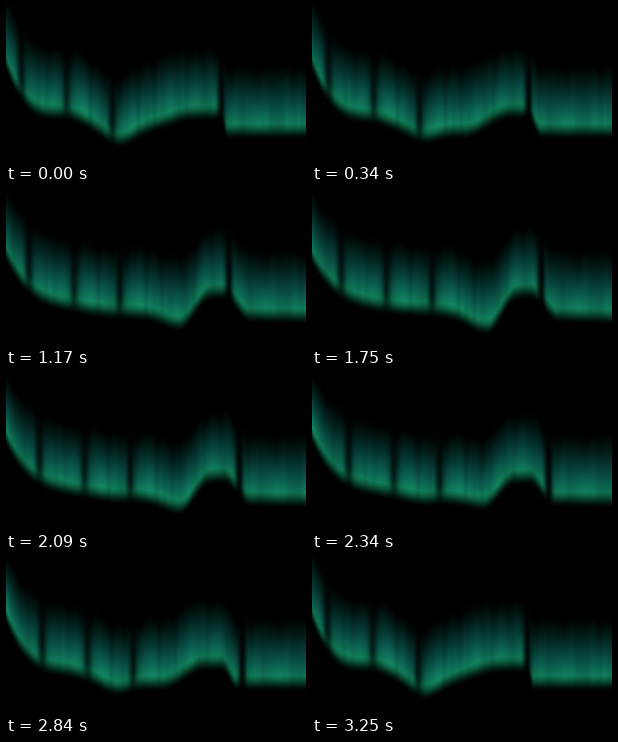
These frames come from a looping animation (300x156 px, 3.34 s). An HTML page with a canvas:

```html
<!DOCTYPE html>
<html lang="en">
<head>
<meta charset="utf-8">
<title>Aurora</title>
<style>
html, body { margin: 0; width: 100%; height: 100%; overflow: hidden; background: #000; }
canvas { display: block; width: 100%; height: 100%; }
</style>
</head>
<body>
<canvas id="sky" width="300" height="156"></canvas>
<script>
const W = 300, H = 156, LOOP = 3340, FPS = 12, STEPS = 40;
const ctx = document.getElementById('sky').getContext('2d');
const img = ctx.createImageData(W, H);

const clamp = v => Math.max(0, Math.min(1, v));
const smooth = v => { v = clamp(v); return v * v * (3 - 2 * v); };
const bell = (x, mid, size) => Math.exp(-(((x - mid) / size) ** 2));
const edge = (x, mid, half) => smooth((x - mid + half) / (2 * half));

// Smooth seeded noise in -1..1.
const hash = n => { const v = Math.sin(n * 127.1 + 3.7) * 43758.5; return (v - Math.floor(v)) * 2 - 1; };
function noise(x) {
  const i = Math.floor(x), u = smooth(x - i);
  return hash(i) * (1 - u) + hash(i + 1) * u;
}

// The folds drift right, ever faster, then slide back before the loop ends.
const driftAt = step => step < 32
  ? 26 * Math.pow(step / 32, 1.5)
  : 26 * (1 - smooth((step - 32) / 7));

// Height of the curtain's lower hem; swell runs 0 -> 1 -> 0 over the loop.
function hemAt(x, swell) {
  const calm = 1 - swell, root = Math.sqrt(swell), peak = swell ** 4;
  const level = 129.5 - 9 * peak * (1 - x / 250);
  const slope = (67 - 18 * peak) * Math.exp(-x / 25);
  const hump = (18 + 5 * swell)
    * edge(x, 155 + 35 * root, 36 - 22 * root)
    * (1 - edge(x, 217 + 15 * swell, 4 + 10 * swell));
  return level - slope - hump
    - 12 * calm * bell(x, 63, 27)
    + 10 * calm * bell(x, 111, 17)
    + 15 * peak * bell(x, 172, 22);
}

const folds = [
  { x: 15, depth: 0.75, size: 4.5 },
  { x: 60, depth: 0.65, size: 4.2 },
  { x: 106, depth: 0.78, size: 4.5 },
  { x: 215, depth: 0.9, size: 4.2 },
];

function draw(step) {
  const drift = driftAt(step);
  const swell = Math.max(0, Math.sin(Math.PI * step / (STEPS - 1)));
  const px = img.data;
  for (let x = 0; x < W; x++) {
    const hem = hemAt(x, swell), s = x - drift;
    const ray = 0.94 + 0.07 * noise(s / 4) + 0.07 * noise(s / 11 + 50);
    const tall = 58 + 4 * noise(s / 7 + 90);
    const dark = folds.map(f => f.depth * bell(s, f.x, f.size));
    for (let y = 0; y < H; y++) {
      const up = hem - y;
      const foot = 1 - smooth((up - 2) / 20);
      let glow = smooth((up + 4) / 18) * Math.pow(1 - clamp((up - 13) / tall), 1.25) * ray;
      dark.forEach((d, j) => { glow *= 1 - d * (j < 3 ? 1 - 0.35 * foot : 1); });
      const p = (y * W + x) * 4;
      px[p] = 17 * Math.pow(glow, 1.4);
      px[p + 1] = 126 * glow;
      px[p + 2] = 126 * glow * (0.66 + 0.22 * smooth(up / 36));
      px[p + 3] = 255;
    }
  }
  ctx.putImageData(img, 0, 0);
}

const start = performance.now();
let shown = -1;
function tick(now) {
  const t = Math.max(0, now - start) % LOOP;
  const step = Math.min(STEPS - 1, Math.floor(t * FPS / 1000));
  if (step !== shown) draw(shown = step);
  requestAnimationFrame(tick);
}
draw(0);
requestAnimationFrame(tick);
</script>
</body>
</html>
```
